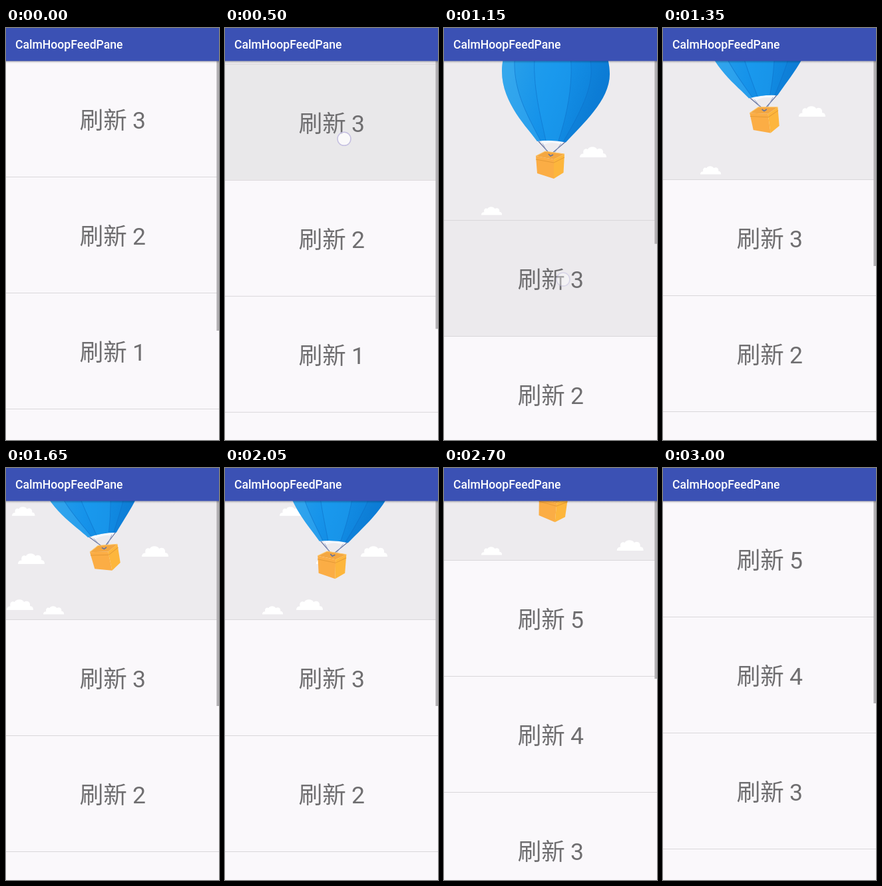
Write an HTML page that moves like this. It is 320 by 618 pixels and loops after 3300 ms.

```html
<!DOCTYPE html>
<html lang="zh-CN">
<head>
<meta charset="utf-8">
<title>Pull to refresh</title>
<style>
  html, body { margin: 0; width: 100%; height: 100%; overflow: hidden; background: #faf8fb; }
  svg { display: block; width: 320px; height: 618px; }
  .row { font: 400 35.56px Roboto, sans-serif; fill: #6f6e70; }
  .word { font-family: "Noto Sans CJK SC", "Noto Sans CJK", sans-serif; font-weight: 350; }
  .title { font: 500 17.6px Roboto, sans-serif; fill: #fff; }
</style>
</head>
<body>
<svg viewBox="0 0 320 618">
  <defs>
    <linearGradient id="skin" x1="0" y1="0.2" x2="1" y2="0.6">
      <stop offset="0" stop-color="#2ea4ea"/>
      <stop offset="0.5" stop-color="#1693ea"/>
      <stop offset="1" stop-color="#0b7dd6"/>
    </linearGradient>
    <linearGradient id="shade" x1="0" y1="0" x2="0" y2="1">
      <stop offset="0" stop-color="#000" stop-opacity="0.26"/>
      <stop offset="1" stop-color="#000" stop-opacity="0"/>
    </linearGradient>
    <path id="cloud" fill="#fff" d="M0 16Q0 10.5 5.5 10.5C4 4 9 2 12 4C14 -1 24 -1 26 4C31 1 36 4 35 10Q40 10 40 16Z"/>
  </defs>

  <rect width="320" height="618" fill="#edebee"/>

  <!-- sky: y = 0 is its lower edge -->
  <g id="sky">
    <use href="#cloud" transform="translate(204 -110)"/>
    <use href="#cloud" transform="translate(56 -20) scale(.78)"/>
    <use href="#cloud" id="high"/>
    <use href="#cloud" id="mid"/>
    <use href="#cloud" id="low"/>
    <g id="balloon">
      <g transform="translate(0 -289)">
        <path d="M145 169L181 170L177 176.5Q162 170 149 176.5Z" fill="#f6f8fc"/>
        <g fill="none" stroke="#62719f" stroke-width="1.2">
          <path d="M142 171L160 191L182 172"/>
          <path d="M148 174L157 190M176 174L164 191" stroke="#8f9cc0" stroke-width=".8"/>
        </g>
        <path id="hull" d="M140 171C127 152 87 114 87 66C87 20 125 -12 170 -12C216 -12 249 25 249 70C249 110 207 146 183 172.5Q161 168 140 171Z" fill="url(#skin)"/>
        <path d="M170 -12C126 0 104 20 106 60C108 105 130 140 145 170L140 171C127 152 87 114 87 66C87 20 125 -12 170 -12Z" fill="#4ab6f0" opacity=".35"/>
        <path d="M170 -12C140 10 134 40 136 70C138 110 148 145 153 170L172 170C182 140 190 105 191 70C192 40 186 10 170 -12Z" fill="#1fa0f2" opacity=".5"/>
        <path d="M170 -12C208 5 222 30 221 70C219 105 194 145 179 172L183 172.5C207 146 249 110 249 70C249 25 216 -12 170 -12Z" fill="#0a68c0" opacity=".2"/>
        <g fill="none" stroke="#0f70c8" stroke-width="1" opacity=".6">
          <path d="M170 -12C126 0 104 20 106 60C108 105 130 140 145 170"/>
          <path d="M170 -12C140 10 134 40 136 70C138 110 148 145 153 170"/>
          <path d="M170 -12C186 10 192 40 191 70C190 105 182 140 172 170"/>
          <path d="M170 -12C208 5 222 30 221 70C219 105 194 145 179 172"/>
        </g>
        <path d="M138 193L152 186L181 190L165 198Z" fill="#f3a742"/>
        <path d="M138 193L165 198L165 227L140 219Z" fill="#fbad45"/>
        <path d="M165 198L181 190L179.500 218L165 227Z" fill="#fdb63c"/>
        <path d="M138 198L165 203L181 195" fill="none" stroke="#e59a35"/>
        <path d="M138 193L152 186L181 190" fill="none" stroke="#ffc868"/>
        <path d="M157 190L160 193L164 191" fill="none" stroke="#62719f" stroke-width="1.6"/>
      </g>
    </g>
  </g>

  <g id="list">
    <rect width="320" height="700" fill="#faf8fb"/>
    <rect id="press" width="320" height="174" fill="#e9e8ea"/>
    <path d="M0 .5H320M0 174.5H320M0 348.5H320M0 522.5H320" stroke="#d9d7da"/>
    <g class="row">
      <text class="word" x="110.8" y="102">刷新</text><text class="count" x="190" y="102"></text>
      <text class="word" x="110.8" y="276">刷新</text><text class="count" x="190" y="276"></text>
      <text class="word" x="110.8" y="450">刷新</text><text class="count" x="190" y="450"></text>
    </g>
  </g>

  <circle id="dot" cx="179" r="10" fill="#fff" fill-opacity=".75" stroke="#c4bfe0" stroke-width="1.5"/>
  <rect id="bar" x="316.4" y="49" width="3.6" fill="#b1afb2"/>
  <rect y="49" width="320" height="4" fill="url(#shade)"/>
  <rect width="320" height="49.5" fill="#3b51b4"/>
  <text class="title" x="14" y="31">CalmHoopFeedPane</text>
</svg>

<script>
const LOOP = 3300, STEP = 50, TOP = 49;
const PRESS = 300, DRAG = 400, RELEASE = 1150, SETTLED = 1350, CLOSE = 2400, SHUT = 3000;
const PULL = 239, REST = 178;
const LEFT = -12.2, RIGHT = 10.5, TURN = 1600;

const $ = id => document.getElementById(id);
const counts = document.querySelectorAll('.count');
const part = (t, a, b) => Math.min(1, Math.max(0, (t - a) / (b - a)));
const ease = u => (1 - Math.cos(Math.PI * u)) / 2;
const move = (id, x, y) => $(id).setAttribute('transform', `translate(${x} ${y})`);

function pulled(t) {
  if (t < RELEASE) return PULL * ease(part(t, DRAG, RELEASE) ** 1.19);
  if (t < CLOSE) return PULL + (REST - PULL) * ease(part(t, RELEASE, SETTLED));
  return REST * (1 - ease(part(t, CLOSE, SHUT)));
}

function tilt(t) {
  if (t < TURN) return LEFT * Math.sin(Math.PI / 2 * part(t, RELEASE, TURN));
  if (t < CLOSE) return LEFT + (RIGHT - LEFT) * ease(part(t, TURN, CLOSE));
  return RIGHT * (1 - ease(part(t, CLOSE, SHUT)));
}

function draw(t) {
  const off = pulled(t), edge = TOP + off;
  const fresh = t > CLOSE;
  move('sky', 0, edge);
  move('list', 0, edge);

  const d = t - 1650;
  $('high').setAttribute('transform', `translate(${9 + .1825 * d} -169) scale(.86)`);
  move('mid', 18 + .278 * d + 4.8e-5 * d * d, -99);
  move('low', 1 + .2768 * d - 2.9e-5 * d * d, -30);
  $('balloon').setAttribute('transform', `rotate(${tilt(t)} 109 -41)`);

  counts.forEach((el, i) => { el.textContent = (fresh ? 5 : 3) - i; });
  $('bar').setAttribute('height', fresh ? 304 - .413 * off : 405 - .545 * off);

  const held = part(t, PRESS - 50, PRESS + 50);
  $('press').setAttribute('opacity', held * (1 - part(t, RELEASE - 20, RELEASE + 80)));
  $('dot').setAttribute('opacity', held * (1 - part(t, RELEASE - 50, RELEASE + 50)));
  $('dot').setAttribute('cy', 162 + .9 * off);
}

const start = performance.now();
function tick() {
  const t = (performance.now() - start) % LOOP;
  draw(Math.floor(t / STEP) * STEP);
  requestAnimationFrame(tick);
}
tick();
</script>
</body>
</html>
```
